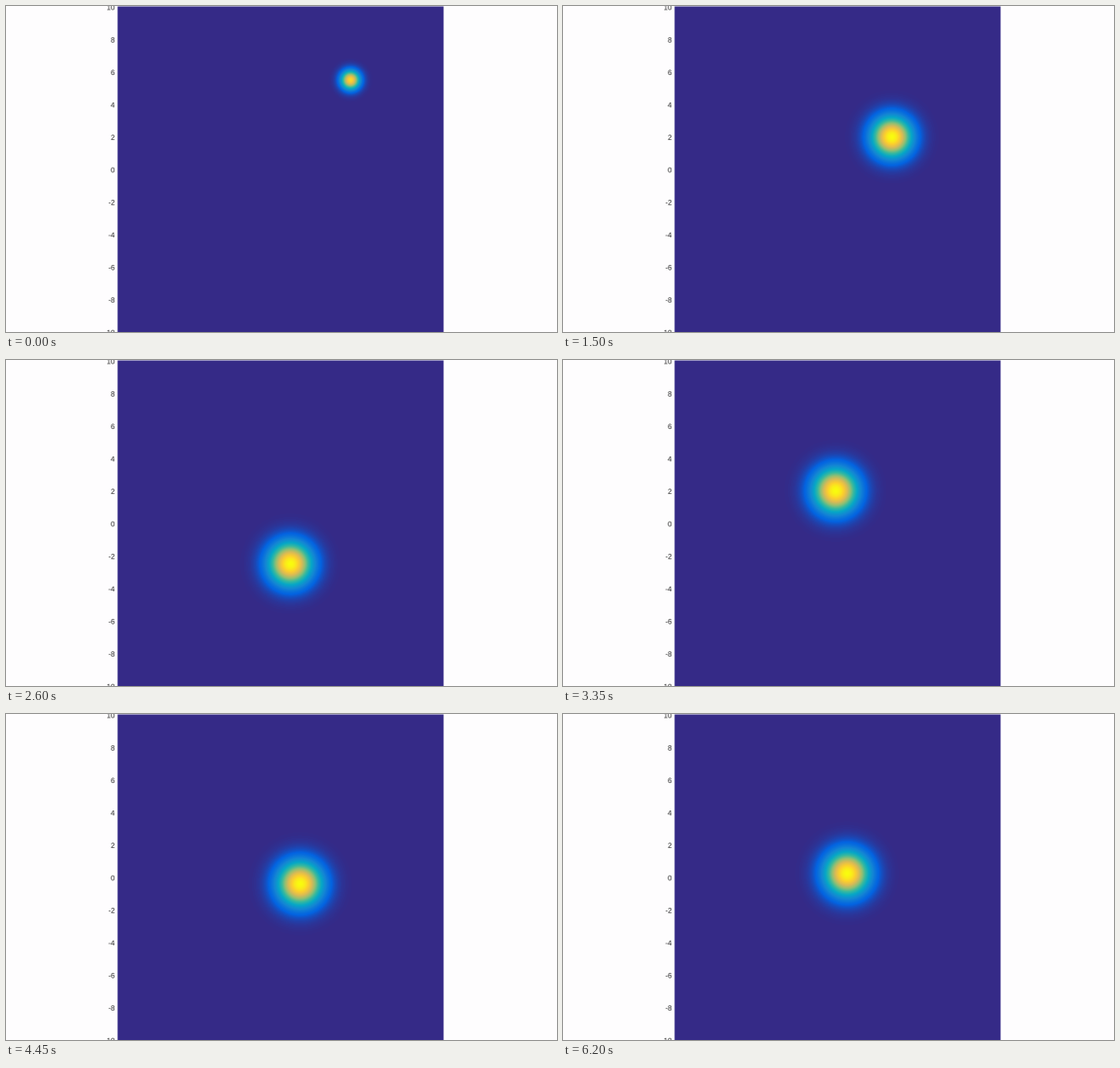
A matplotlib script for the animation above (6.25 s loop, 600x355 px).

```python
import numpy as np
import matplotlib.pyplot as plt
from matplotlib.animation import FuncAnimation
from matplotlib.colors import LinearSegmentedColormap
from matplotlib.patches import PathPatch, Rectangle
from matplotlib.textpath import TextPath
from matplotlib.transforms import Affine2D

W, H, DPI = 600, 355, 100
FRAMES, STEP = 125, 50          # 6250 ms loop
SCALE = 17.7                    # pixels per data unit
X0, Y0 = 299, 178.5             # pixel position of the data origin
LEFT, TOP, SIDE = 122, 1, 354

# Damped oscillator for the mean, exponential relaxation for the spread
GAMMA, OMEGA, PHASE = 0.395, 3.958, -0.728
S_START, S_END = 0.41, 0.955

parula = LinearSegmentedColormap.from_list("parula", [
    "#352a87", "#0363e1", "#1485d4", "#06a7c6", "#38b99e",
    "#92bf73", "#d9ba56", "#fcce2e", "#f9fb0e"])

pixels = np.arange(SIDE) + 0.5
xs = (LEFT + pixels - X0) / SCALE
ys = (Y0 - TOP - pixels) / SCALE


def mean(t):
    decay = np.exp(-GAMMA * t)
    c, s = np.cos(OMEGA * t + PHASE), np.sin(OMEGA * t + PHASE)
    return -decay * (0.7 * c + 7.25 * s), 0.12 + 7.25 * decay * c


def density(t):
    mx, my = mean(t)
    var = S_END**2 + (S_START**2 - S_END**2) * np.exp(-t)
    peak = 1 - 0.1 * np.exp(-4 * t)
    gx = np.exp(-(xs - mx)**2 / (2 * var))
    gy = np.exp(-(ys - my)**2 / (2 * var))
    return peak * np.outer(gy, gx)


fig = plt.figure(figsize=(W / DPI, H / DPI), dpi=DPI, facecolor="#fefdfe")
ax = fig.add_axes([0, 0, 1, 1])
ax.axis("off")

# Soft half-pixel rim around the plot area
ax.add_patch(Rectangle((LEFT - 0.5, TOP - 0.5), SIDE + 1, SIDE + 1,
                       color=parula(0.0), lw=0, snap=False, zorder=0))
image = ax.imshow(density(0), cmap=parula, vmin=0, vmax=1, aspect="auto",
                  interpolation="nearest", zorder=1,
                  extent=(LEFT, LEFT + SIDE, TOP + SIDE, TOP))
ax.set_xlim(0, W)
ax.set_ylim(H, 0)


def tick_label(v):
    path = TextPath((0, 0), str(v), size=8, prop={"family": "Liberation Sans"})
    place = Affine2D().scale(1, -1).translate(
        118.2 - path.get_extents().x1, Y0 - v * SCALE + 2.8)
    ax.add_patch(PathPatch(place.transform_path(path), fc="#262626", lw=0,
                           snap=False, zorder=2))


for v in range(-10, 11, 2):
    tick_label(v)


def update(i):
    image.set_data(density(i * STEP / 1000))
    return (image,)


anim = FuncAnimation(fig, update, frames=FRAMES, interval=STEP,
                     repeat=True, repeat_delay=0, blit=False)
plt.show()
```
